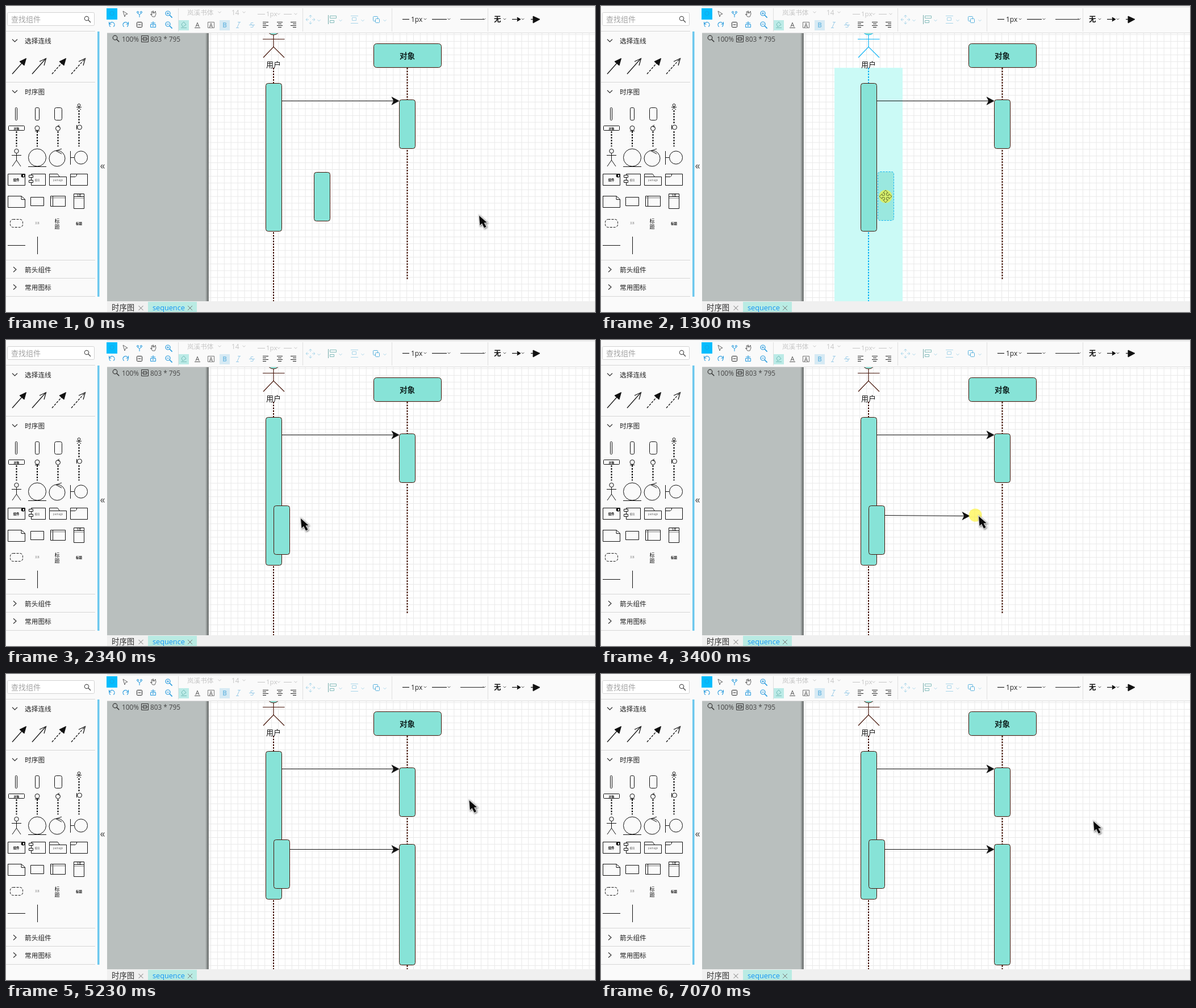
These frames come from a looping animation (1037x540 px, 7.13 s). An HTML page with a canvas:

```html
<!DOCTYPE html>
<html lang="zh">
<head>
<meta charset="utf-8">
<title>Sequence diagram editor</title>
<style>
html, body { margin: 0; width: 100%; height: 100%; overflow: hidden; background: #fff; }
canvas { display: block; }
</style>
</head>
<body>
<canvas id="stage" width="1037" height="540"></canvas>
<script>
const W = 1037, H = 540, LOOP = 7130;
const SANS = '"Open Sans", "Noto Sans CJK SC", "Noto Sans CJK", sans-serif';
const MINT = '#87e3d7', BROWN = '#451408', BLUE = '#12b4f5', INK = '#111';
const screen2d = document.getElementById('stage').getContext('2d');
let c = screen2d;

// --- drawing helpers ---
function path(pts, color = INK, width = 1, fill) {
  c.beginPath();
  for (let i = 0; i < pts.length; i += 2) c.lineTo(pts[i], pts[i + 1]);
  if (fill) { c.closePath(); c.fillStyle = fill; c.fill(); }
  if (color) { c.strokeStyle = color; c.lineWidth = width; c.stroke(); }
}
function dashed(pts, color, width, dash) {
  c.setLineDash(dash);
  path(pts, color, width);
  c.setLineDash([]);
}
function box(x, y, w, h, r = 0, color = INK, fill, width = 1) {
  c.beginPath();
  c.roundRect(x, y, w, h, r);
  if (fill) { c.fillStyle = fill; c.fill(); }
  if (color) { c.strokeStyle = color; c.lineWidth = width; c.stroke(); }
}
function rect(x, y, w, h, fill) { c.fillStyle = fill; c.fillRect(x, y, w, h); }
function circle(x, y, r, color = INK, fill, width = 1) {
  c.beginPath();
  c.arc(x, y, r, 0, 7);
  if (fill) { c.fillStyle = fill; c.fill(); }
  if (color) { c.strokeStyle = color; c.lineWidth = width; c.stroke(); }
}
function text(s, x, y, size, color = '#333', weight = 400, align = 'left') {
  c.font = `${weight} ${size}px ${SANS}`;
  c.textAlign = align;
  c.fillStyle = color;
  c.fillText(s, x, y);
}
function chevron(x, y, s, color, width = 1) { path([x - s, y - s / 2, x, y + s / 2, x + s, y - s / 2], color, width); }
function cross(x, y) {
  path([x - 4, y - 4, x + 4, y + 4], '#777');
  path([x + 4, y - 4, x - 4, y + 4], '#777');
}
function lens(x, y, r, color, sign) {
  circle(x, y, r, color, null, 1.2);
  path([x + r * .7, y + r * .7, x + r * 1.9, y + r * 1.9], color, 1.5);
  if (sign) path([x - 2, y, x + 2, y], color);
  if (sign === '+') path([x, y - 2, x, y + 2], color);
}
function dots(x, y1, y2) { dashed([x, y1, x, y2], INK, 2, [3, 2]); }

// --- component palette, shared by the side bar and the popup ---
function paletteIcons() {
  box(16.5, 179.5, 3, 22, 1);
  box(51.5, 179.5, 7, 22, 2);
  box(85.5, 179.5, 13, 22, 3);
  circle(128.5, 175, 2.3);
  path([128.5, 177, 128.5, 180]);
  path([124, 178.5, 133, 178.5]);
  path([125, 183, 128.5, 180, 132, 183]);
  dots(128.5, 184, 208);

  box(4.5, 211.5, 28, 8, 1);
  text('对象', 18.5, 217.5, 5, INK, 700, 'center');
  circle(55, 215.5, 4);
  path([51, 220.5, 59, 220.5]);
  circle(91.5, 216, 4);
  path([94, 210, 91, 212, 94, 214]);
  circle(129.5, 214, 4);
  path([124.5, 210, 124.5, 218]);
  for (const x of [18.5, 55, 91.5, 128.5]) dots(x, 221, 248);

  circle(18.5, 256, 3.7);
  path([18.5, 260, 18.5, 272]);
  path([10, 263.5, 27, 263.5]);
  path([11, 283, 18.5, 272, 26, 283]);
  circle(55, 267.5, 15.5);
  path([39, 283.5, 71, 283.5]);
  circle(90, 269, 14);
  path([98, 252, 88, 255.5, 98, 261]);
  circle(132, 267.5, 11.5);
  path([113.5, 256, 113.5, 280]);
  path([114, 267.5, 120, 267.5]);

  box(3.5, 296.5, 30, 20);
  text('组件', 18, 308.5, 5.5, INK, 700, 'center');
  box(27, 297, 6, 5, 2, INK, INK);
  rect(30, 298, 2, 3, '#fff');
  box(44.5, 296.5, 25, 20);
  box(40.5, 298.5, 7, 4, 0, INK, '#fff');
  box(40.5, 307.5, 7, 4, 0, INK, '#fff');
  text('模块', 55, 308.5, 4.5, '#666', 400, 'center');
  box(76.5, 301.5, 30, 15);
  path([76.5, 301, 76.5, 296.5, 91, 296.5, 94, 301]);
  text('package', 91.5, 309, 4.5, '#666', 400, 'center');
  box(113.5, 296.5, 30, 20);
  path([113.5, 301.5, 122, 301.5, 124.5, 299, 124.5, 296.5]);

  path([3.5, 335.5, 27, 335.5, 33.5, 341, 33.5, 355.5, 3.5, 355.5, 3.5, 335]);
  path([27, 335.5, 27, 341.5, 33.5, 341.5]);
  box(43.5, 337.5, 23, 15);
  box(78.5, 335.5, 26, 18);
  path([82.5, 336, 82.5, 354]);
  path([79, 338.5, 104, 338.5], '#777');
  box(119.5, 331.5, 18, 26);
  path([120, 336.5, 137, 336.5]);
  text('标题', 128.5, 335.5, 4, INK, 400, 'center');
  path([120, 339.5, 137, 339.5], '#999');

  c.setLineDash([4, 2]);
  box(7.5, 376.5, 22, 14, 5);
  c.setLineDash([]);
  text('文本', 55, 385, 4, '#666', 400, 'center');
  text('标', 90, 382.5, 9, INK, 400, 'center');
  text('题', 90, 392.5, 9, INK, 400, 'center');
  text('标题', 128.5, 385.5, 5.5, INK, 700, 'center');
  path([3, 422.5, 34, 422.5]);
  path([55.5, 407, 55.5, 438]);
}

function sideBar() {
  rect(0, 0, 178, H, '#fafafa');
  box(2.5, 11.5, 153, 23, 2, '#d2d2d2', '#fff');
  text('查找组件', 9, 28, 13, '#a3a3a3');
  lens(142, 22, 3.7, '#555');
  for (const y of [44.5, 134.5, 448.5, 480.5, 512.5]) path([0, y, 157, y], '#d6d6d6');
  rect(161, 45, 3.5, 468, '#6cc7ee');
  for (const [s, y, open] of [['选择连线', 61, 1], ['时序图', 151, 1], ['箭头组件', 465, 0], ['常用图标', 496, 0]]) {
    if (open) chevron(15.5, y, 4.5, '#333', 1.2);
    else path([13, y - 4.5, 18, y, 13, y + 4.5], '#333', 1.2);
    text(s, 33, y + 4.8, 11.7, '#222');
  }
  for (let i = 0; i < 4; i++) {
    const x = [11, 46, 81, 115][i];
    if (i > 1) dashed([x, 120, x + 23, 94], INK, 1.2, [4, 2]);
    else path([x, 120, x + 23, 94], INK, 1.2);
    const head = [x + 13, 98, x + 24.5, 92.5, x + 21, 105];
    if (i % 2) path(head, INK, 1.2);
    else path(head, INK, 1, INK);
  }
  paletteIcons();
  text('«', 165.5, 288, 18, '#444');
}

function arrowTool(x1, x2, y, color) { path([x1, y, x2, y], color, 1.2); }

function toolBar() {
  rect(178, 0, W, 48, '#fafafa');
  rect(178, 0, W, 3, '#eeeeee');
  path([178, 47.5, W, 47.5], '#dcdcdc');
  for (const x of [303.5, 522.5, 679.5, 848.5]) path([x, 4, x, 45], '#dfdfdf');

  const blue = '#2398dd', pale = '#c6c6c6', dark = '#222';
  rect(177, 4, 19, 20, '#04bdfd');
  circle(186.5, 13, 3.5, '#18a5e4');
  path([206, 9, 214, 14, 210.5, 15, 209, 19, 206, 9], '#666');
  circle(232, 11, 1.5, blue);
  circle(238, 11, 1.5, blue);
  path([232, 13, 235, 15.5, 238, 13], blue);
  path([235, 15, 235, 20], blue);
  path([255, 14, 257, 16, 256, 10, 258, 10, 259, 13, 259, 8.5, 261, 13, 263, 9, 264, 14, 262, 19, 258, 19, 254, 14], '#666');
  lens(285, 13, 4, blue, '+');
  lens(285, 32, 4, blue, '-');
  for (const [x, side] of [[186.5, -1], [210.5, 1]]) {
    c.beginPath();
    c.arc(x, 33, 4.5, 2.2, 7.2);
    c.strokeStyle = blue;
    c.lineWidth = 1.2;
    c.stroke();
    path([x + side * 5, 28, x + side * 5, 32, x + side, 32], blue);
  }
  box(230.5, 28.5, 9, 9, 1, dark);
  path([232.5, 33, 237.5, 33], dark);
  box(254.5, 32.5, 9, 5, 0, blue);
  path([259, 27, 259, 32], blue);
  path([255, 30, 263, 30], blue);
  path([257, 35, 261, 35], blue);

  text('岚溪书体', 319, 16, 11.6, pale);
  text('14', 397, 16, 12, pale);
  path([443, 14.5, 456, 14.5], pale);
  text('1px', 458, 18, 11.5, pale);
  path([489, 14.5, 503, 14.5], pale);
  for (const [x, y] of [[376, 11], [419, 11], [480, 14], [510, 14]]) chevron(x, y, 2.5, pale);

  rect(304, 25, 18, 18, '#bcebe7');
  path([309, 32, 313, 28, 317, 33, 311, 37, 309, 32], '#76bdb8');
  path([308, 38.5, 318, 38.5], '#76bdb8');
  text('A', 337, 37, 11, '#555', 400, 'center');
  path([332, 38.5, 342, 38.5], '#555');
  text('A', 361, 37.5, 10, '#555', 400, 'center');
  box(355.5, 28.5, 11, 10, 0, '#777');
  rect(376, 25, 18, 18, '#d6eaf4');
  text('B', 385, 38, 12, '#84c3e5', 700, 'center');
  path([411, 29, 407, 38], '#9acbe8');
  path([408, 28.5, 413, 28.5], '#9acbe8');
  path([405, 38.5, 410, 38.5], '#9acbe8');
  text('S', 433, 38, 12, '#9acbe8', 400, 'center');
  path([428, 33.5, 438, 33.5], '#9acbe8');
  for (let k = 0; k < 3; k++) {
    for (let j = 0; j < 4; j++) {
      const w = j % 2 ? 6 : 10, x = [452, 477, 501][k] + (10 - w) * k / 2;
      path([x, 28.5 + j * 3, x + w, 28.5 + j * 3], dark);
    }
  }

  const soft = '#a9d6ea';
  for (let q = 0; q < 4; q++) {
    c.save();
    c.translate(536, 24);
    c.rotate(q * Math.PI / 2);
    path([-2.5, -5.5, 0, -8, 2.5, -5.5], soft);
    path([0, -8, 0, -3], soft);
    c.restore();
  }
  path([567.5, 16, 567.5, 32], '#74aaa9');
  box(570.5, 17.5, 11, 4, 0, '#83bcbb');
  box(570.5, 25.5, 7, 4, 0, '#83bcbb');
  path([607, 17.5, 620, 17.5], soft);
  box(609.5, 20.5, 7, 5, 0, soft);
  path([607, 30.5, 620, 30.5], soft);
  box(646.5, 18.5, 8, 8, 1, '#5ab2de');
  box(650.5, 22.5, 7, 7, 1, '#5ab2de', '#fafafa');
  for (const x of [551, 589, 628, 667]) chevron(x, 25.5, 2.5, soft);

  arrowTool(698, 710, 23.5, dark);
  text('1px', 713, 28, 12, '#222');
  arrowTool(750, 776, 23.5, dark);
  arrowTool(800, 842, 23.5, dark);
  text('无', 859, 28, 12.5, INK, 700);
  arrowTool(891, 903, 23.5, INK);
  path([900, 20, 906, 23.5, 900, 27, 901, 23.5], INK, 1, INK);
  arrowTool(924, 932, 23.5, INK);
  path([928, 18, 940, 23.5, 928, 30], INK, 1, INK);
  for (const x of [738, 780, 842, 878, 910]) chevron(x, 23, 2.3, '#555');
}

function workspace() {
  rect(178, 48, 180, 474, '#b9bfbe');
  const shade = c.createLinearGradient(351, 0, 358, 0);
  shade.addColorStop(0, '#b9bfbe');
  shade.addColorStop(.65, '#6f7372');
  shade.addColorStop(1, '#a5a9a8');
  rect(351, 48, 6.5, 474, shade);
  rect(357, 48, W, 474, '#fff');
  const step = 11.9;
  for (let x = 360.5; x < W; x += step) path([x, 48, x, 522], '#e9e9e9');
  for (let y = 50.5; y < 522; y += step) path([357, y, W, y], '#e9e9e9');

  lens(192, 56, 3.8, '#333');
  text('100%', 204, 62.5, 11.8, '#444');
  box(238.5, 52.5, 12, 11, 0, '#333');
  box(241.5, 55.5, 6, 5, 0, '#333');
  path([239, 58, 250, 58], '#555');
  text('803 * 795', 254, 62.5, 11.8, '#444');
}

function tabs() {
  rect(178, 521, W, 19, '#f0f0f0');
  text('时序图', 186, 537, 13.4, '#333');
  cross(237.5, 533);
  rect(250, 522, 86, 18, '#b9ebe3');
  text('sequence', 258, 537, 12.7, '#1295f5');
  cross(324, 533);
}

// --- diagram ---
function bar(x, y, h) { box(x + .5, y + .5, 28, h, 4, BROWN, MINT); }
function lifeline(x, y2, color) { dashed([x, 109, x, y2], color, 2, [3, 2]); }
function link(x1, y1, x2, y2) {
  path([x1, y1, x2 - 9, y2], INK);
  path([x2, y2, x2 - 13, y2 - 7, x2 - 9.5, y2, x2 - 13, y2 + 7], INK, .6, INK);
}
function actor(color) {
  circle(471, 39.5, 11.5, color, MINT);
  path([471, 51, 471, 72], color, 1.2);
  path([452, 58.5, 490.5, 58.5], color, 1.2);
  path([453, 91, 471, 72, 490, 91], color, 1.2);
  text('用户', 471, 107.5, 13, '#151515', 500, 'center');
}

// Linear track over steps: [step, value, value, ...]
function at(track, i) {
  let a = track[0];
  for (const b of track) {
    if (b[0] > i) {
      const u = (i - a[0]) / (b[0] - a[0]);
      return u <= 0 ? a.slice(1) : a.slice(1).map((v, k) => v + (b[k + 1] - v) * u);
    }
    a = b;
  }
  return a.slice(1);
}
const pointer = [
  [0, 833, 370], [1, 790, 367], [2, 705, 358], [3, 617, 362], [4, 575, 345], [5, 556, 336],
  [6, 556, 336], [8, 525, 336], [10, 501, 336], [12, 486, 336], [13, 486, 336], [15, 552, 353],
  [18, 519, 315], [19, 509, 309], [20, 500, 309], [21, 500, 309], [25, 641, 311], [26, 665, 311],
  [28, 706, 311], [30, 706, 313], [33, 745, 331], [34, 754, 329], [36, 726, 333], [38, 726, 333],
  [42, 905, 113], [46, 1025, 190], [47, 1017, 155], [48, 1006, 129], [51, 935, 190], [54, 867, 260]
];
const linkEnd = [[21, 500], [25, 626], [26, 649], [28, 700]];

function popup() {
  c.save();
  c.shadowColor = 'rgba(0,0,0,.35)';
  c.shadowBlur = 4;
  box(700.5, 309.5, 161, 173, 3, '#b5c6cc', '#fff');
  c.restore();
  c.save();
  c.beginPath();
  c.rect(702, 311, 156, 169);
  c.clip();
  for (let k = 0; k < 16; k++) rect(707 + k % 4 * 36.7, 317 + (k >> 2) * 38.5, 35.5, 36, '#fbfbfb');
  rect(707, 317, 36, 35, '#e4f3f5');
  c.translate(707, 144);
  paletteIcons();
  c.restore();
  rect(858.5, 311, 3.5, 26, '#62c2ee');
  rect(702, 479.5, 158, 2.5, '#72bfe3');
}

function toast() {
  c.save();
  c.shadowColor = 'rgba(0,0,0,.18)';
  c.shadowBlur = 11;
  c.shadowOffsetY = 3;
  box(584, 43, 139, 41, 2, null, '#fff');
  c.restore();
  circle(607, 63.5, 7.7, null, '#18bd31');
  path([603.5, 63.5, 606, 66.5, 610.5, 61], '#fff', 1.5);
  text('美化绘图成功!', 623, 68.5, 13.3, '#333');
}

function moveCursor(x, y) {
  c.save();
  c.translate(x, y);
  for (let q = 0; q < 4; q++) {
    path([-1.7, -2, -1.7, -6, -4.5, -6, 0, -11, 4.5, -6, 1.7, -6, 1.7, -2], '#65712b');
    c.rotate(Math.PI / 2);
  }
  c.restore();
}
function arrowCursor(x, y, hollow) {
  c.save();
  c.translate(x, y);
  if (hollow) {
    path([0, 0, 0, 15, 3.5, 12, 6.5, 18.5, 9, 17.5, 6, 11, 11, 11], '#222', 1, '#fff');
  } else {
    c.shadowColor = 'rgba(0,0,0,.45)';
    c.shadowBlur = 3;
    c.shadowOffsetX = c.shadowOffsetY = 1;
    const shape = [0, 0, 1.5, 17, 5, 13.5, 9, 21.5, 12.5, 19.5, 8.5, 12.5, 13.5, 12];
    path(shape, '#ddd', 2.4, '#ddd');
    c.shadowColor = 'transparent';
    path(shape, null, 0, '#0a0a0a');
  }
  c.restore();
}

const base = document.createElement('canvas');
base.width = W;
base.height = H;
c = base.getContext('2d');
workspace();
sideBar();
toolBar();
tabs();
c = screen2d;

function draw(i) {
  const [x, y] = at(pointer, i);
  const over = i >= 8 && i < 13, dragging = i >= 6 && i < 13, inserted = i >= 38;
  c.drawImage(base, 0, 0);
  c.save();
  c.beginPath();
  c.rect(178, 48, W - 178, 473);
  c.clip();

  if (over) rect(411, 109, 120, 412, '#cbfaf6');
  lifeline(471, 521, over ? BLUE : BROWN);
  actor(over ? BLUE : BROWN);
  lifeline(706.5, inserted ? 521 : 484, BROWN);
  box(647.5, 66.5, 119, 42, 5, BROWN, MINT);
  text('对象', 706.5, 92.5, 13.5, '#102422', 600, 'center');
  bar(457, 136, 261);
  bar(692, 165, 86);
  link(486, 167.5, 692, 167.5);

  if (dragging) {
    c.setLineDash([3, 2]);
    box(x - 13.5, 292.5, 28, 86, 4, BLUE, 'rgba(146,229,219,.85)');
    c.setLineDash([]);
  } else if (i < 6) bar(542, 293, 86);
  else bar(471, 292, 86);

  if (inserted) bar(692, 300, 213);
  if (i >= 22) link(500, 309.5, inserted ? 692 : at(linkEnd, i)[0], inserted ? 309.5 : 310.5);
  if (i >= 30 && !inserted) popup();
  c.restore();
  if (i >= 44 && i < 51) toast();

  if (dragging || (i >= 21 && i < 29)) circle(dragging ? x : x - 6, dragging ? y : y - 2, 11.5, null, 'rgba(255,244,35,.6)');
  if (i >= 5 && i < 13) moveCursor(x, y);
  else if (i < 43 || i > 45) arrowCursor(x, y, i >= 30 && !inserted);
}

function tick(now) {
  const t = now % LOOP;
  draw(Math.max(0, 1 + Math.floor((t - 94) / 131.3)));
  requestAnimationFrame(tick);
}
requestAnimationFrame(tick);
</script>
</body>
</html>
```
